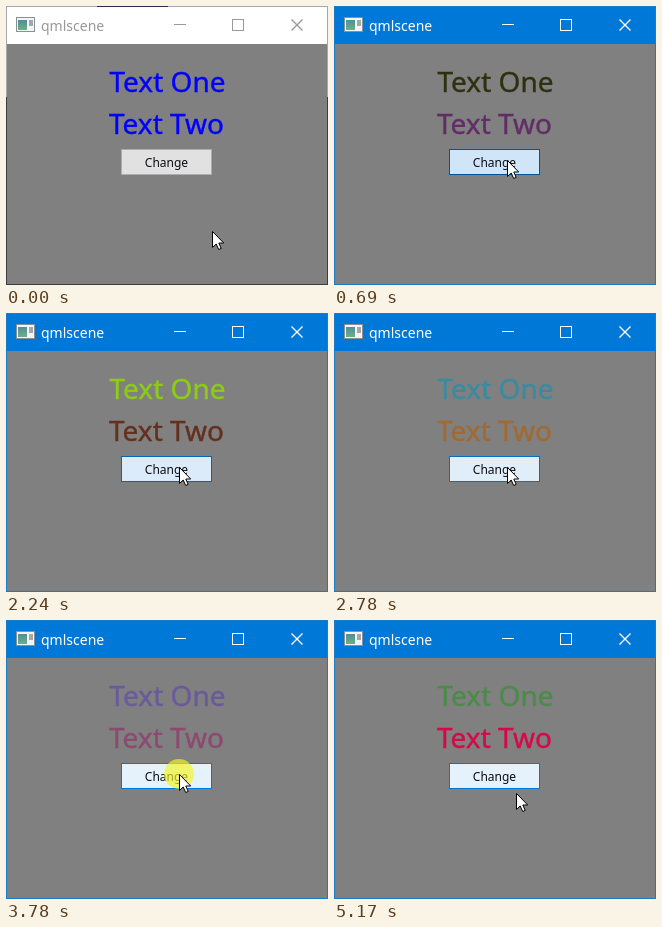
Write an HTML page that moves like this. It is 322 px wide and 279 px high and loops after 5250 ms.

```html
<!DOCTYPE html>
<html lang="en">
<head>
<meta charset="utf-8">
<title>qmlscene</title>
<style>
  html, body { margin: 0; width: 100%; height: 100%; overflow: hidden; background: #808080; }
  svg { display: block; width: 322px; height: 279px; }
  text { font-family: "Noto Sans", "Open Sans", sans-serif; }

  .bar, .frame, .title, .desktop, .one, .two, .ring, .cursor {
    animation: 5250ms step-end infinite;
  }
  .bar { animation-name: bar; }
  .frame { animation-name: frame; fill: none; }
  .title { animation-name: title; }
  .desktop { animation-name: desktop; fill: none; }
  .one { animation-name: one; }
  .two { animation-name: two; }
  .ring { animation-name: ring; }
  .cursor { animation-name: cursor; }
  .button { animation: button 5250ms linear infinite; }
  .label {
    font-size: 28px; text-anchor: middle;
    fill: currentColor; stroke: currentColor; stroke-width: .4px;
  }
  .crisp { shape-rendering: crispEdges; }

  /* Window gains focus with the first press */
  @keyframes bar { 0% { fill: #fff; } 10.27%, 100% { fill: #0078d7; } }
  @keyframes frame { 0% { stroke: #3c3c42; } 10.27%, 100% { stroke: #1a7cc8; } }
  @keyframes title { 0% { color: #999; } 10.27%, 100% { color: #fff; } }
  @keyframes desktop { 0% { opacity: 1; } 10.27%, 100% { opacity: 0; } }

  /* Each release picks new text colours */
  @keyframes one {
    0% { color: #0000ff; }
    13.13% { color: #2e300f; }
    23.6% { color: #3c4cb6; }
    32.36% { color: #7a3a8c; }
    39.8% { color: #8ccc14; }
    48.56% { color: #3a8aa0; }
    57.32% { color: #a8e440; }
    66.08% { color: #6a5a9c; }
    74.84%, 100% { color: #4c8a4a; }
  }
  @keyframes two {
    0% { color: #0000ff; }
    13.13% { color: #622c66; }
    23.6% { color: #b8c40e; }
    32.36% { color: #3a8a60; }
    39.8% { color: #64301c; }
    48.56% { color: #a06a30; }
    57.32% { color: #6cc894; }
    66.08% { color: #8c4a70; }
    74.84%, 100% { color: #d6084a; }
  }

  /* Press highlight */
  @keyframes ring {
    0%, 13.13%, 23.6%, 32.36%, 39.8%, 48.56%, 57.32%, 66.08%, 74.84%, 100% { opacity: 0; }
    10.27%, 20.75%, 29.51%, 36.75%, 45.51%, 54.46%, 63.22%, 71.99% { opacity: 1; }
  }
  /* Idle, then fading between hover and pressed */
  @keyframes button {
    0%, 7.4% { fill: #e1e1e1; stroke: #adadad; }
    8.8%, 10.27%, 18.86%, 20.75%, 29.51%, 36.75%, 45.51%, 54.46%, 63.22%, 71.99%, 80.57%, 100% {
      fill: #e5f1fb; stroke: #0078d7;
    }
    13.13%, 23.6%, 32.36%, 39.8%, 48.56%, 57.32%, 66.08%, 74.84% { fill: #d0e5f8; stroke: #005499; }
  }
  @keyframes cursor {
    0% { transform: translate(206px, 225px); }
    1.52% { transform: translate(204px, 220px); }
    2.85% { transform: translate(201px, 210px); }
    4.38% { transform: translate(195px, 196px); }
    5.9% { transform: translate(186px, 180px); }
    7.42% { transform: translate(178px, 165px); }
    8.76% { transform: translate(174px, 157px); }
    10.27% { transform: translate(173px, 154px); }
    98.47%, 100% { transform: translate(182px, 173px); }
  }
</style>
</head>
<body>
<svg viewBox="0 0 322 279">
  <defs>
    <linearGradient id="pane" x2="0" y2="1">
      <stop stop-color="#4d8f9c"/>
      <stop offset="1" stop-color="#6fae84"/>
    </linearGradient>
  </defs>

  <rect width="322" height="279" fill="#808080"/>
  <rect class="bar" width="322" height="38"/>
  <rect class="frame crisp" x=".5" y=".5" width="321" height="278"/>
  <g class="desktop crisp">
    <path d="M.5 91V.5H321.5V91" stroke="#a6a6ac"/>
    <path d="M91 .5H162" stroke="#2a2a4a"/>
  </g>

  <g class="crisp" transform="translate(10 11)">
    <rect x=".5" y=".5" width="18" height="14" fill="#f4f4f4" stroke="#8a9096"/>
    <rect x="2" y="3" width="9" height="10" fill="url(#pane)"/>
    <rect x="13" y="3" width="4" height="6" fill="#a4a8ac"/>
  </g>

  <g class="title" fill="none" stroke="currentColor">
    <text x="35" y="24.5" font-size="14" fill="currentColor" stroke="none">qmlscene</text>
    <path class="crisp" d="M168 18.5h12M226.5 13.5h11v11h-11z"/>
    <path d="M285.5 13.5l11 11m0-11l-11 11" stroke-width="1.4"/>
  </g>

  <text class="label one" x="161.5" y="86">Text One</text>
  <text class="label two" x="160.5" y="128">Text Two</text>

  <rect class="button crisp" x="115.5" y="143.5" width="90" height="25"/>
  <text x="160.5" y="161" font-size="12" text-anchor="middle" fill="#0c0c14">Change</text>

  <circle class="ring" cx="173" cy="154" r="15" fill="#f6f620" fill-opacity=".66"/>
  <path class="cursor" d="M.5 .5V16.5L4.2 13L6.7 18.5L9.2 17.4L6.8 12H11.7Z"
        fill="#fff" stroke="#000"/>
</svg>
</body>
</html>
```
